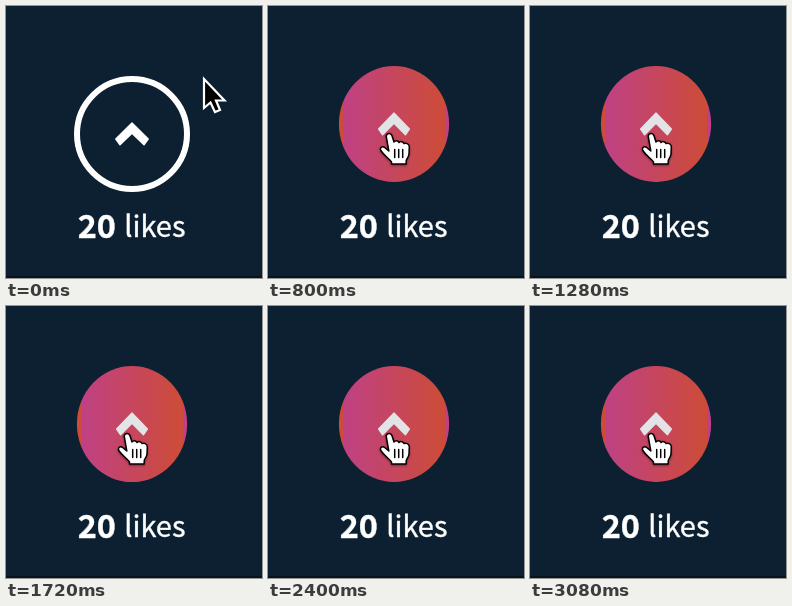
Write an HTML page that moves like this. It is 256 by 272 pixels and loops after 3120 ms.

```html
<!DOCTYPE html>
<html lang="en">
<head>
<meta charset="utf-8">
<title>Like button</title>
<style>
  html, body { margin: 0; width: 100%; height: 100%; overflow: hidden; background: #0c2031; }
  svg { display: block; width: 256px; height: 272px; }
  text { font-family: "Noto Sans CJK JP", "Noto Sans CJK SC", "Noto Sans", sans-serif; fill: #fff; stroke: #fff; stroke-width: .4; }
  #hand { filter: drop-shadow(0 1px 1px rgba(0, 0, 0, .4)); }
</style>
</head>
<body>
<svg viewBox="0 0 256 272">
  <defs>
    <linearGradient id="glow" gradientUnits="userSpaceOnUse" x1="-54" y1="0" x2="54" y2="0" spreadMethod="repeat">
      <stop offset="0" stop-color="#d84690"/>
      <stop offset="1" stop-color="#e85238"/>
    </linearGradient>
  </defs>
  <rect width="256" height="272" fill="#0c2031"/>
  <rect y="270" width="256" height="2" fill="#07141f"/>

  <g id="button">
    <circle id="ring" r="55" fill="none" stroke="#fff" stroke-width="6"/>
    <circle id="disc" r="58" fill="url(#glow)"/>
    <path d="M0-11L16.2 5L12 10.8L0-.8L-12 10.8L-16.2 5Z" fill="#fff" stroke="#fff" stroke-width="1.4" stroke-linejoin="round"/>
  </g>

  <text x="71.7" y="232" font-size="32.4" font-weight="700">20</text>
  <text x="118.2" y="230.5" font-size="29" font-weight="500">likes</text>

  <!-- both cursors have their hot spot at 0,0 -->
  <g id="arrow">
    <path d="M1 2V31L7.5 25.5L12 35L17 33L13 23.5H21.5Z" fill="#000" stroke="#fff" stroke-width="2.2"/>
  </g>
  <g id="hand" stroke="#000" stroke-width="1.5" stroke-linejoin="round" stroke-linecap="round">
    <path fill="#fff" d="M-2.8 2.2C-2.3-1 2-1.4 3 1.8L5 8C6 6.2 9.4 6.2 10 8.6C11.3 7 14.3 7.4 15 9.6C17 8.6 20 9.6 20.3 12.5L20 20C19.6 23.5 17.4 25 17.2 27V30H2.5V28C0 24.5-5 21.5-8.2 16.5C-9.5 13.5-6.5 11.7-4 13.8L-.2 17Z"/>
    <path fill="none" d="M5.7 15.5V23.5M9.7 15.5V23.5M13.7 15.5V23.5"/>
  </g>
</svg>
<script>
const LOOP = 3120, STEP = 40, HOVER = 146, BOUNCE = 900, RISE = 235;
const el = id => document.getElementById(id);
const clamp = x => Math.min(1, Math.max(0, x));
const smooth = x => { x = clamp(x); return x * x * (3 - 2 * x); };
const show = (id, on) => el(id).setAttribute("visibility", on ? "visible" : "hidden");
const place = (id, value) => el(id).setAttribute("transform", value);

// 0 at rest, 1 fully lifted; rises, hovers, then drops back
function liftAt(t) {
  if (t < HOVER) return 0;
  const phase = (t - HOVER) % BOUNCE;
  return smooth(Math.min(phase, BOUNCE - phase) / RISE);
}

function draw(t) {
  const over = t >= HOVER, lift = liftAt(t);
  place("button", `translate(126 ${128 - 10 * lift}) scale(${1 - 0.05 * lift} 1)`);
  el("button").setAttribute("opacity", 1 - 0.12 * lift);
  show("ring", !over);
  show("disc", over);

  const go = smooth((t - 10) / 280);
  const spot = `translate(${197 - 76 * go} ${71 + 57 * go})`;
  place("arrow", spot);
  place("hand", spot);
  show("arrow", !over);
  show("hand", over);
}

const start = performance.now();
function tick() {
  const t = (performance.now() - start) % LOOP;
  draw(Math.floor(t / STEP) * STEP);
  requestAnimationFrame(tick);
}
draw(0);
requestAnimationFrame(tick);
</script>
</body>
</html>
```
